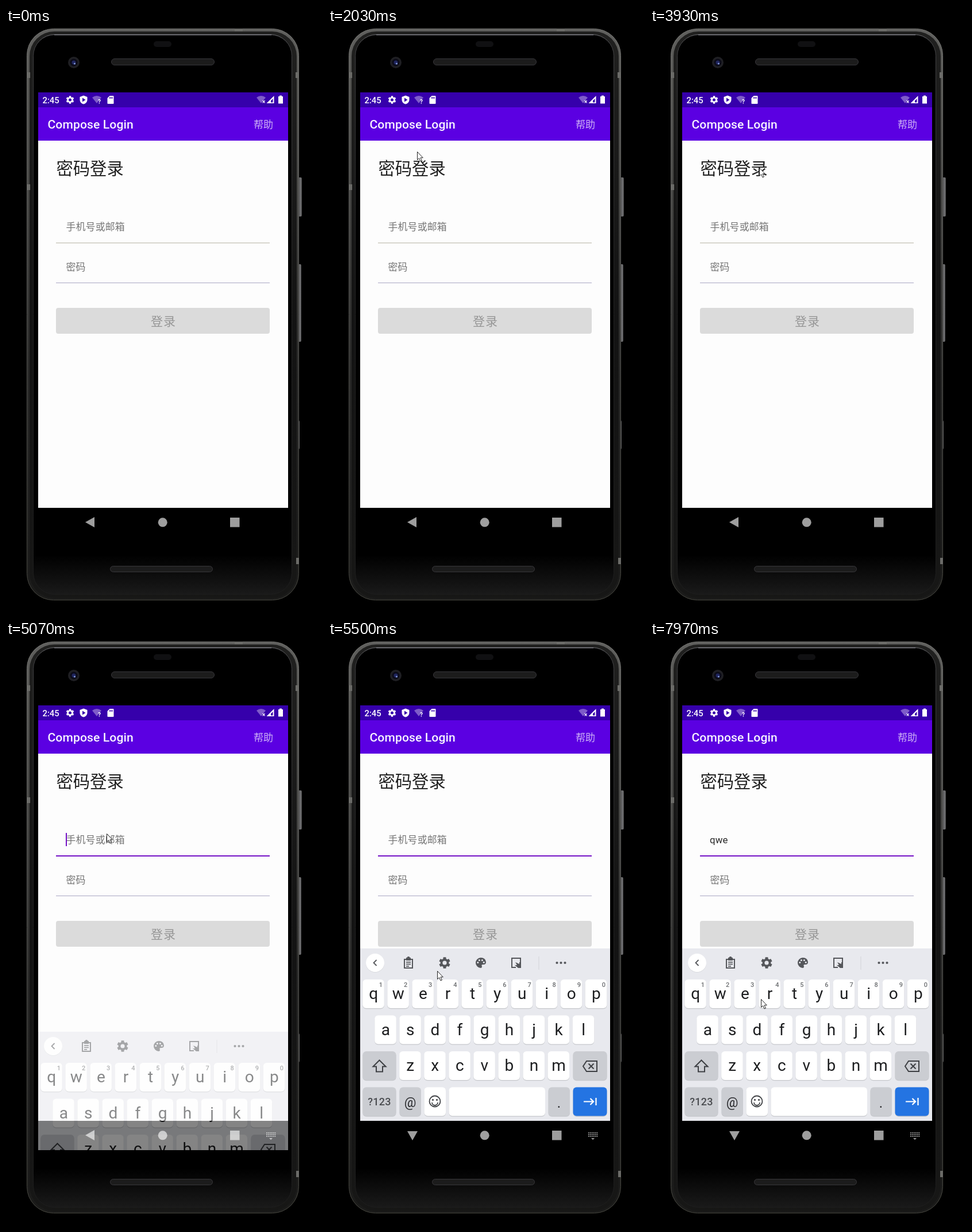
An HTML page with a canvas for the animation above (8000 ms loop, 550 px wide and 1018 px high).

```html
<!DOCTYPE html>
<html lang="zh">
<head>
<meta charset="utf-8">
<title>Compose Login</title>
<style>
html, body { margin: 0; width: 100%; height: 100%; overflow: hidden; background: #000; }
canvas { display: block; }
</style>
</head>
<body>
<canvas id="stage" width="550" height="1018"></canvas>
<script>
const LOOP = 8000;
const CJK = '"Noto Sans CJK SC", "Noto Sans CJK", sans-serif';
const ROBOTO = 'Roboto, "Noto Sans CJK SC", sans-serif';
const PURPLE = '#7410c6';
const SCREEN = { x: 56, y: 112, w: 435, h: 774 };
const KB_TOP = 535, KB_H = 300;

const view = document.getElementById('stage').getContext('2d');
let g = view;

const layer = paint => {
  const c = document.createElement('canvas');
  c.width = 550;
  c.height = 1018;
  g = c.getContext('2d');
  paint();
  g = view;
  return c;
};

// ---- drawing helpers ----
function rect(x, y, w, h, fill) {
  g.fillStyle = fill;
  g.fillRect(x, y, w, h);
}
function box(x, y, w, h, r, fill, line, width = 1) {
  g.beginPath();
  g.roundRect(x, y, w, h, r);
  if (fill) { g.fillStyle = fill; g.fill(); }
  if (line) { g.strokeStyle = line; g.lineWidth = width; g.stroke(); }
}
function disc(x, y, r, fill) {
  g.beginPath();
  g.arc(x, y, r, 0, 7);
  g.fillStyle = fill;
  g.fill();
}
function text(s, x, y, font, fill, spacing = 0, align = 'left') {
  g.font = font;
  g.fillStyle = fill;
  g.letterSpacing = spacing + 'px';
  g.textAlign = align;
  g.fillText(s, x, y);
}
// SVG path placed at x, y
function shape(d, x, y, fill, line, width = 2) {
  g.save();
  g.translate(x, y);
  const p = new Path2D(d);
  if (fill) { g.fillStyle = fill; g.fill(p, 'evenodd'); }
  if (line) { g.strokeStyle = line; g.lineWidth = width; g.stroke(p); }
  g.restore();
}
function fade(x0, y0, x1, y1, ...stops) {
  const f = g.createLinearGradient(x0, y0, x1, y1);
  stops.forEach(([at, c]) => f.addColorStop(at, c));
  return f;
}
function gear(x, y, r, fill) {
  g.beginPath();
  for (let i = 0; i < 6; i++) {
    for (const [da, k] of [[-.36, .74], [-.24, 1], [.24, 1], [.36, .74]]) {
      const a = i * Math.PI / 3 + Math.PI / 2 + da;
      g.lineTo(x + Math.cos(a) * r * k, y + Math.sin(a) * r * k);
    }
  }
  g.closePath();
  g.moveTo(x + r * .36, y);
  g.arc(x, y, r * .36, 0, 7);
  g.fillStyle = fill;
  g.fill('evenodd');
}

// ---- phone ----
function slot(x, y, w, h) {
  box(x, y, w, h, h / 2, '#1c1c1c', '#37363a');
}
function phone() {
  rect(0, 0, 550, 1018, '#000');
  for (const [x, y, w, h] of [[508, 260, 7, 68], [508, 411, 6, 135], [507, 683, 4, 50]])
    box(x, y, w, h, 2, fade(x, 0, x + w, 0, [0, '#333'], [.7, '#77777a'], [1, '#444']));

  box(36.5, 1.5, 473, 994, 46,
    fade(0, 0, 0, 996, [0, '#60605e'], [.1, '#555552'], [.3, '#454543'], [.6, '#2a2a29'], [1, '#1b1b1a']),
    fade(0, 0, 0, 996, [0, '#777774'], [.4, '#5c5c5a'], [1, '#46463f']));
  box(41, 6, 465, 986, 43,
    fade(0, 0, 0, 996, [0, '#20201f'], [.5, '#131313'], [1, '#171716']));
  box(47.5, 11.5, 450, 974, 37,
    fade(0, 0, 0, 986, [0, '#000'], [.93, '#000'], [1, '#1a1a1a']),
    fade(0, 0, 0, 986, [0, '#8c8c92'], [.03, '#444446'], [.4, '#262626'], [1, '#1d1d1d']));
  rect(84, 11, 378, 1.5, '#85858d');

  for (const [x, y, w, h] of [[36, 77, 6, 10], [36, 272, 6, 10], [504, 77, 6, 10], [505, 922, 5, 11], [398, 1, 14, 5]])
    rect(x, y, w, h, '#6b6b68');

  box(257, 23, 31, 10, 5, '#101012');
  slot(183.5, 53.5, 179, 11);
  slot(181.5, 936.5, 178, 10);
  disc(118, 60, 10, '#1f1f23');
  disc(118, 60, 6.5, '#0b0b18');
  disc(118, 60, 3.5, '#20265e');
  disc(119.5, 62, 1.6, '#7f95d8');
}

// ---- app screen ----
function wifi(x, y, mark) {
  shape('M-8-4Q0-10 8-4L0 6Z', x, y, 'rgba(255,255,255,.36)');
  text(mark, x + 2, y + 7, '700 10px ' + ROBOTO, '#fff');
}
function app() {
  rect(56, 112, 435, 26, '#3600ab');
  rect(56, 138, 435, 58, '#5b00e2');
  rect(56, 196, 435, 639, '#fdfdfd');

  text('2:45', 63.5, 130.5, '500 14.8px ' + ROBOTO, '#fff');
  gear(111.5, 125, 7, '#fff');
  shape('M0-7.5L6.5-5V-.5C6.5 3.5 4 6.5 0 7.5C-4 6.5-6.5 3.5-6.5-.5V-5ZM-2-3.5V3.5L3.5 0Z', 135, 125, '#fff');
  wifi(158, 125, '?');
  shape('M-1.5-7H4.5Q5.5-7 5.5-6V6Q5.5 7 4.5 7H-4.5Q-5.5 7-5.5 6V-3ZM-2-5V-2H-.8V-5ZM.2-5V-2H1.4V-5ZM2.4-5V-2H3.6V-5Z', 182, 125, '#fff');
  wifi(444, 125, '×');
  shape('M6.5-6.5V6.5H-6.5ZM4.5-1.5L1 2V5H4.5Z', 460, 124.5, '#fff');
  shape('M-2-7H2V-5.5H4V7H-4V-5.5H-2Z', 478, 124.5, '#fff');

  text('Compose Login', 72.5, 175, '500 21.1px ' + ROBOTO, '#f8f4ff', .1);
  text('帮助', 431, 173.5, '17px ' + CJK, '#cdb2f6');
  text('密码登录', 87.5, 255, '29.3px ' + CJK, '#222');
  text('密码', 104.5, 421.5, '16.9px ' + CJK, '#757575', .16);
  rect(87, 443, 372, 1, '#a9a6c4');
  box(87, 487, 372, 45, 4, '#dbdbdb');
  text('登录', 252, 518, '21px ' + CJK, '#969696', 1);
}

// ---- keyboard ----
function key(x, y, w, fill = '#fff') {
  box(x, y + 1.2, w, 50, 6, '#c6c8cc');
  box(x, y, w, 50, 6, fill);
}
function letters(row, x, y) {
  [...row].forEach((c, i) => {
    const cx = x + i * 43.05;
    key(cx - 19, y, 37.5);
    text(c, cx, y + 34, '28px ' + ROBOTO, '#1d1e20', 0, 'center');
  });
}
function keyboard() {
  const ink = '#55575b', grey = '#cbcdd2';
  rect(56, KB_TOP, 435, KB_H, '#e8e9ee');

  disc(82, 560.7, 16, '#d3d5d9');
  disc(82, 560, 16, '#fff');
  shape('M2.5-5L-2.5 0L2.5 5', 82, 560, null, ink, 1.8);
  shape('M-7-7H7V8H-7Z', 140, 561, null, ink, 2);
  rect(136, 551, 8, 5, ink);
  disc(140, 551.5, 2.5, ink);
  [558, 561.5, 565].forEach((y, i) => rect(136, y, i == 2 ? 5 : 8, 1.7, ink));
  gear(203, 560, 10, ink);
  shape('M0-9A9 9 0 0 0 0 9Q3 8 1.5 5Q1 3 3.5 3H5.5Q9 2.5 9-1.5Q8-9 0-9Z', 266, 560, ink);
  for (const [x, y] of [[-5.2, -.5], [-2.6, -4.5], [2.4, -4.5], [5.2, -.8]])
    disc(266 + x, 560 + y, 1.5, '#e8e9ee');
  shape('M7-1V-8H-8V8H-1', 328, 560, null, ink, 2);
  shape('M-2-1L5 2V-1H8V9H3L-3 4L1 4Z', 328, 560, ink);
  rect(366.5, 549, 1, 23, '#d2d4d8');
  for (let i = -1; i < 2; i++) disc(405.5 + i * 7, 560, 2.1, ink);

  letters('qwertyuiop', 79.3, 589);
  for (let i = 0; i < 10; i++)
    text(String((i + 1) % 10), 92 + i * 43.1, 602, '500 11px ' + ROBOTO, '#6b6d70', 0, 'center');
  letters('asdfghjkl', 100.3, 651.5);
  letters('zxcvbnm', 143.2, 714);

  key(60.5, 714, 58, grey);
  shape('M0-10.5L11 .5H5.5V9.5H-5.5V.5H-11Z', 89.5, 740, null, '#3e4044', 2);
  key(426.5, 714, 59, grey);
  shape('M-12 0L-6-9H12V9H-6ZM-2.5-4.5L6.5 4.5M6.5-4.5L-2.5 4.5', 456, 740, null, '#3e4044', 2);

  key(60.5, 776.5, 58, grey);
  text('?123', 89.5, 808, '500 18px ' + ROBOTO, '#4a4c50', .3, 'center');
  key(124.5, 776.5, 37.5, grey);
  text('@', 143, 811, '23px ' + ROBOTO, '#2b2c2f', 0, 'center');
  key(167.5, 776.5, 37.5);
  g.beginPath();
  g.arc(186, 801, 9.5, 0, 7);
  g.moveTo(191, 803);
  g.arc(186, 803, 5, 0, Math.PI);
  g.strokeStyle = '#3e4044';
  g.lineWidth = 1.8;
  g.stroke();
  disc(182.5, 798.5, 1.6, '#3e4044');
  disc(189.5, 798.5, 1.6, '#3e4044');
  key(210.5, 776.5, 167.5);
  key(383.5, 776.5, 37.5, grey);
  text('.', 402, 812, '24px ' + ROBOTO, '#1d1e20', 0, 'center');
  key(426.5, 776.5, 59, '#2474e2');
  shape('M-11 0H6M.5-5.5L6 0L.5 5.5M10.5-6.5V6.5', 456, 801.5, null, '#fff', 2.2);
}

const base = layer(() => { phone(); app(); });
const keys = layer(keyboard);

// ---- motion ----
const FOCUS = 4950, KB_START = 5000, KB_TIME = 230;
const TYPED = [[6750, 'q'], [7060, 'w'], [7300, 'e']];
const PATH = [
  [1600, 3, 150], [2030, 155, 215], [2450, 172, 226], [3300, 186, 240], [3930, 190, 243],
  [4700, 176, 335], [5120, 175, 335], [5500, 190, 574], [5750, 193, 623], [LOOP, 193, 623]
];
const clamp = v => Math.min(1, Math.max(0, v));
const ramp = (t, from, time) => clamp((t - from) / time);

function field(t) {
  const on = ramp(t, FOCUS, 100);
  rect(87, 373.5, 372, 1, '#b3afa0');
  if (on) {
    g.globalAlpha = on;
    rect(87, 373, 372, 2, PURPLE);
    g.globalAlpha = 1;
  }

  const done = TYPED.filter(k => t >= k[0]);
  const value = done.map(k => k[1]).join('');
  let caret = 104;
  if (value) {
    text(value, 104, 352, '16.9px ' + ROBOTO, '#2a2a2a', .16);
    caret += g.measureText(value).width;
  } else {
    text('手机号或邮箱', 104.5, 351.5, '16.9px ' + CJK, '#757575', .16);
  }
  const since = t - (done.length ? done[done.length - 1][0] : FOCUS);
  if (since >= 0 && since % 1000 < 500) rect(caret, 334, 2, 23, PURPLE);
}

function slideKeys(t) {
  const p = 1 - (1 - ramp(t, KB_START, KB_TIME)) ** 2;
  if (!p) return;
  g.save();
  g.beginPath();
  g.rect(SCREEN.x, SCREEN.y, SCREEN.w, SCREEN.h);
  g.clip();
  g.globalAlpha = p;
  g.drawImage(keys, 0, Math.round(KB_H * (1 - p)));
  g.restore();
}

function navBar(t) {
  const c = 'rgba(255,255,255,.62)';
  g.save();
  g.translate(147, 860);
  g.rotate(-Math.PI / 2 * ramp(t, 5130, 150));
  shape('M-9 0L7-9V9Z', 0, 0, c);
  g.restore();
  disc(272.7, 860.3, 8, c);
  rect(390, 852, 16.5, 16.5, c);
  if (t < KB_START) return;
  for (let r = 0; r < 3; r++)
    for (let i = 0; i < 6; i++) rect(453 + i * 2.9, 855 + r * 3, 1.8, 1.8, c);
  shape('M-3 0H3L0 3Z', 461, 865, c);
}

function pointer(t) {
  if (t < PATH[0][0]) return;
  const i = PATH.findIndex(p => p[0] > t);
  const [t0, x0, y0] = PATH[i - 1], [t1, x1, y1] = PATH[i];
  const k = (t - t0) / (t1 - t0), e = k * k * (3 - 2 * k);
  shape('M.5.5V14.5L3.6 11.6L6 17L8.4 16L6 10.8H10.3Z',
    Math.round(x0 + (x1 - x0) * e), Math.round(y0 + (y1 - y0) * e), '#fff', '#222', 1);
}

function draw(t) {
  g.drawImage(base, 0, 0);
  field(t);
  slideKeys(t);
  navBar(t);
  pointer(t);
}

let start;
function tick(now) {
  start ??= now;
  draw((now - start) % LOOP);
  requestAnimationFrame(tick);
}
draw(0);
requestAnimationFrame(tick);
</script>
</body>
</html>
```
